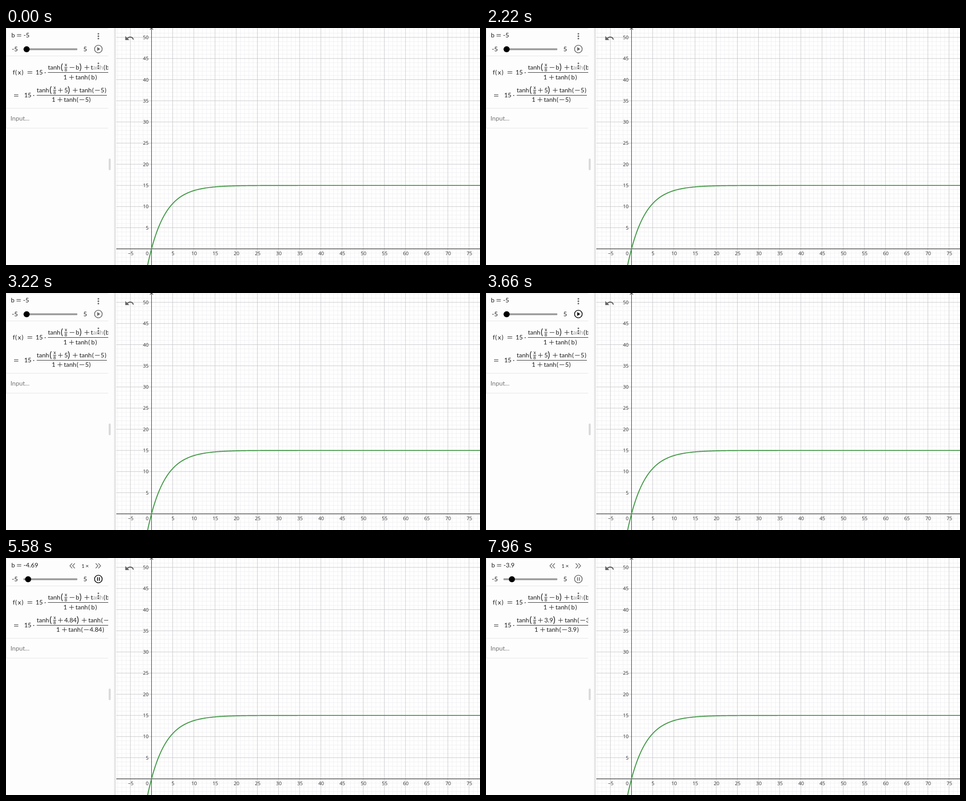
These frames come from a looping animation (1057 by 530 pixels, 8000 ms). An HTML page:

```html
<!DOCTYPE html>
<html lang="en">
<head>
<meta charset="utf-8">
<title>Function slider</title>
<style>
  html, body { margin: 0; width: 100%; height: 100%; overflow: hidden; background: #fff; }
  svg { display: block; }
  text { font: 14px Lato, "Open Sans", sans-serif; fill: #1c1c1c; white-space: pre; }
  .tick { font: 11px "Open Sans", "Noto Sans", sans-serif; fill: #303030; }
  .mid { text-anchor: middle; }
  .end { text-anchor: end; }
  .line { fill: none; stroke: #222; stroke-width: 1; }
</style>
</head>
<body>
<svg id="stage" width="1057" height="530" viewBox="0 0 1057 530">
  <defs>
    <clipPath id="panelClip"><rect width="228" height="530"/></clipPath>
    <clipPath id="plotClip"><rect x="244" width="813" height="530"/></clipPath>
    <linearGradient id="edge">
      <stop offset="0" stop-color="#fdfdfd"/>
      <stop offset=".5" stop-color="#dedee0"/>
      <stop offset="1" stop-color="#fafafa"/>
    </linearGradient>
  </defs>
  <g clip-path="url(#plotClip)">
    <path id="minor" fill="none" stroke="#efeff2"/>
    <path id="major" fill="none" stroke="#c6c6c9"/>
    <path d="M244 493.9H1057M324.5 0V530M321 3.5L324.5 0L328 3.5" fill="none" stroke="#303030" stroke-width="1.1"/>
    <g id="ticks"></g>
    <path id="curve" fill="none" stroke="#459a49" stroke-width="2.2"/>
    <path d="M266 18V27H275Z" fill="#666"/>
    <path d="M269.5 24.5Q273 20.3 277 20.3Q282.5 20.6 284 26" fill="none" stroke="#666" stroke-width="2.4"/>
  </g>
  <rect width="243" height="530" fill="#fdfdfd"/>
  <rect x="240" width="6" height="530" fill="url(#edge)"/>
  <rect x="229" y="292" width="4.5" height="26" rx="2" fill="#d9d9d9"/>
  <path d="M.5 224V1.5H228M0 62.5H228M0 179.5H228M0 224H228" fill="none" stroke="#e3e3e3"/>

  <g id="static" clip-path="url(#panelClip)"></g>
  <g id="result" clip-path="url(#panelClip)"></g>
  <g id="name"></g>
  <rect id="veil" x="194" y="75" width="23" height="20" fill="#fdfdfd"/>
  <g id="rowMenu"><circle cx="206" cy="79" r="1.8"/><circle cx="206" cy="84.6" r="1.8"/><circle cx="206" cy="90.2" r="1.8"/></g>
  <g id="topMenu" fill="#666"><circle cx="206" cy="13" r="1.8"/><circle cx="206" cy="18.4" r="1.8"/><circle cx="206" cy="23.8" r="1.8"/></g>
  <g id="speed">
    <path d="M147.5 12L142.5 17.5L147.5 23M153.5 12L148.5 17.5L153.5 23M200 12L205 17.5L200 23M206 12L211 17.5L206 23" fill="none" stroke="#666" stroke-width="1.5"/>
    <text x="168.5" y="21.5" style="font-size:11px">1</text>
    <text x="177.5" y="21.5" style="font-size:12px">×</text>
  </g>
  <rect x="39" y="45.5" width="120" height="4" rx="1" fill="#999"/>
  <circle id="knob" cy="47.5" r="6.8" fill="#000"/>
  <g id="button">
    <circle cx="206" cy="47" r="8.5" fill="none" stroke="currentColor" stroke-width="1.7"/>
    <path id="play" d="M203.5 42.8V51.2L210 47Z" fill="currentColor"/>
    <path id="pause" d="M203.9 43V51M208.1 43V51" stroke="currentColor" stroke-width="1.7"/>
  </g>
</svg>
<script>
const LOOP = 8000;
const $ = id => document.getElementById(id);
const toX = x => 324.5 + 9.44 * x;
const toY = y => 493.9 - 9.46 * y;

const txt = (x, y, s, size = 14, cls = '') =>
  `<text x="${x}" y="${y}" class="${cls}" style="font-size:${size}px">${s}</text>`;
const line = d => `<path class="line" d="${d}"/>`;

// Operators sit on the math axis, 5px above the baseline.
const minus = (x, y) => line(`M${x} ${y - 4.7}h10.5`);
const plus = (x, y) => minus(x, y) + line(`M${x + 5.25} ${y - 10}v10.5`);
const equals = (x, y, w = 10.5) => line(`M${x} ${y - 6.5}h${w}m0 3.6h${-w}`);
const tanh = (x, y) => txt(x, y, 'tanh') + txt(x + 28.5, y, '(');

// tanh(x/8 ... : opening of both numerators
const numeratorStart = (x, y) =>
  txt(x, y, 'tanh') + txt(x + 28.6, y + 1, '(', 19) +
  txt(x + 40, y - 7, 'x', 10.5, 'mid') + txt(x + 40, y + 4.3, '8', 10, 'mid') +
  line(`M${x + 36.5} ${y - 4.5}h7`);

function drawGrid() {
  let minor = '', major = '', ticks = '';
  for (let i = -8; i <= 77; i++) {
    const vertical = `M${toX(i)} 0V530`;
    if (i % 5) { minor += vertical; continue; }
    major += vertical;
    if (i) ticks += `<text class="tick mid" x="${toX(i) + .7}" y="508">${String(i).replace('-', '−')}</text>`;
  }
  for (let i = -3; i <= 52; i++) {
    const horizontal = `M244 ${toY(i)}H1057`;
    if (i % 5) { minor += horizontal; continue; }
    major += horizontal;
    if (i) ticks += `<text class="tick end" x="318" y="${toY(i) + 4}">${i}</text>`;
  }
  ticks += '<text class="tick end" x="318" y="508">0</text>';
  $('minor').setAttribute('d', minor);
  $('major').setAttribute('d', major);
  $('ticks').innerHTML = ticks;
}

function drawStatic() {
  $('static').innerHTML =
    txt(13, 52, '-5') + txt(172.5, 52, '5') +
    `<g opacity=".6">${txt(10, 206.5, 'Input...')}</g>` +
    txt(15, 104, 'f') + txt(20.5, 104, '(') + txt(26.5, 104, 'x') + txt(35, 104, ')') +
    equals(48, 104) + txt(66, 104, '15') + txt(85.5, 104, '·') +
    numeratorStart(93.5, 93) + minus(142, 93) + txt(155.5, 93, 'b') + txt(163.5, 94, ')', 19) +
    plus(175, 93) + tanh(189, 93) + txt(222, 93, 'b') +
    line('M93.5 99.5H228') +
    txt(128, 115, '1') + plus(141, 115) + tanh(155, 115) + txt(190, 115, 'b') + txt(199, 115, ')') +
    equals(18, 155.5, 9.5) + txt(40.5, 155, '15') + txt(60, 155, '·');
}

function drawResult(b) {
  const value = String(-b);
  const extra = value.length > 1 ? (value.length - 2) * 8 + 4 : 0;
  const start = 103 + extra / 2;
  $('result').innerHTML =
    numeratorStart(68.5, 144) + plus(116, 144) + txt(130, 144, value) +
    txt(137.5 + extra, 145, ')', 19) + plus(149 + extra, 144) +
    tanh(163.5 + extra, 144) + minus(198.5 + extra, 144) +
    txt(211 + extra, 144, value) + txt(220 + 2 * extra, 144, ')') +
    line(`M68.5 150.5H${225 + 2 * extra}`) +
    txt(start - 1, 165, '1') + plus(start + 12, 165) + tanh(start + 26, 165) +
    minus(start + 61, 165) + txt(start + 73.5, 165, value) + txt(start + 82 + extra, 165, ')');
}

function drawCurve(b) {
  let d = '';
  for (let x = -1.2; x <= 78; x += .2) {
    const y = 15 * (Math.tanh(x / 8 - b) + Math.tanh(b)) / (1 + Math.tanh(b));
    d += `${d ? 'L' : 'M'}${toX(x).toFixed(2)} ${toY(y).toFixed(2)}`;
  }
  $('curve').setAttribute('d', d);
}

// The slider moves by 0.157 per tick; the formula follows a little later.
const sliderTimes = [5150, 5580, 6040, 6460, 6860, 7260, 7720];
const formulaTimes = [5420, 5860, 6300, 6720, 7140, 7500, 7950];
const valueAt = (times, t) =>
  +(-5 + .157 * times.filter(at => t >= at).length).toFixed(2);
const show = (id, on) => $(id).setAttribute('display', on ? 'inline' : 'none');

let shownFormula;
function render(t) {
  const b = valueAt(sliderTimes, t);
  const formulaB = valueAt(formulaTimes, t);
  const running = t >= 4900;
  const rowHover = t >= 2660 && t < 3140;
  const buttonHover = t >= 3380 && t < 5860;
  const left = t < 540 || running ? 12 : 11;

  $('name').innerHTML = txt(left, 21, 'b') + equals(left + 12.5, 21, 9.5) + txt(left + 27, 21, b);
  $('knob').setAttribute('cx', 46 + 10.7 * (b + 5));
  $('veil').setAttribute('opacity', rowHover ? .8 : .6);
  $('rowMenu').setAttribute('fill', rowHover ? '#111' : '#666');
  $('button').setAttribute('color', buttonHover ? '#000' : '#666');
  show('topMenu', !running);
  show('speed', running);
  show('play', !running);
  show('pause', running);
  if (formulaB !== shownFormula) {
    shownFormula = formulaB;
    drawResult(formulaB);
    drawCurve(formulaB);
  }
}

drawGrid();
drawStatic();
const began = performance.now();
function tick() {
  render((performance.now() - began) % LOOP);
  requestAnimationFrame(tick);
}
tick();
</script>
</body>
</html>
```
